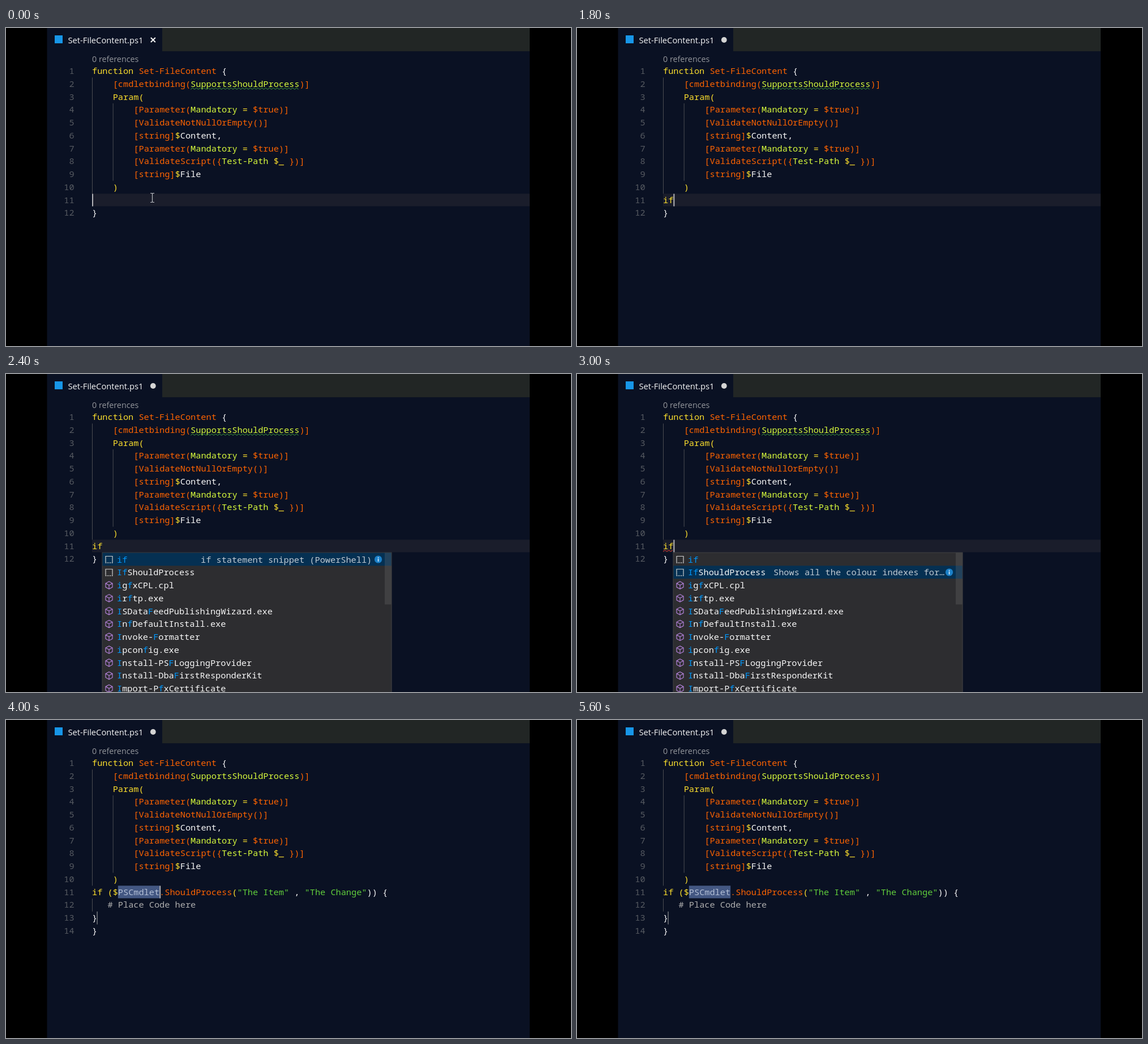
These frames come from a looping animation (998 px wide and 561 px high, 5.8 s). An HTML page:

```html
<!DOCTYPE html>
<html lang="en">
<head>
<meta charset="utf-8">
<title>Editor snippet</title>
<style>
html, body { margin: 0; width: 100%; height: 100%; overflow: hidden; background: #000; }
svg { display: block; width: 998px; height: 561px; }
text { white-space: pre; font: 500 15.28px "Noto Sans Mono", monospace; font-variant-ligatures: none; }
.ui { font-family: "Open Sans", sans-serif; font-weight: 400; }
.w { fill: #f8f8f8; }
.y { fill: #fbde2d; }
.o { fill: #ff6400; }
.l { fill: #d8fa3c; }
.g { fill: #61ce3c; }
.c { fill: #aeaeae; }
.s { fill: #b3bfd6; }
.n { fill: #565a61; font-weight: 400; }
.b { fill: #0097fb; }
.d { fill: #c2cad2; font-weight: 400; }
</style>
</head>
<body>
<svg id="stage" viewBox="0 0 998 561"></svg>
<script>
const NS = "http://www.w3.org/2000/svg";
const CH = 9.168, ROW = 22.77, LEFT = 152;
const LOOP = 5800;
const stage = document.getElementById("stage");

function add(parent, tag, attrs, content) {
  const el = document.createElementNS(NS, tag);
  for (const k in attrs) el.setAttribute(k, attrs[k]);
  if (content !== undefined) el.textContent = content;
  parent.appendChild(el);
  return el;
}
const group = (parent = stage) => add(parent, "g", {});
const rect = (p, x, y, width, height, fill) => add(p, "rect", { x, y, width, height, fill });
const path = (p, d, stroke, width = 1) =>
  add(p, "path", { d, stroke, "stroke-width": width, fill: "none" });
const baseline = line => 81 + (line - 1) * ROW;
const lineTop = line => 64.6 + (line - 1) * ROW;
const show = (el, on) => el.setAttribute("visibility", on ? "inherit" : "hidden");

// Alternating class and text: "y", "if", "w", " {"
function runs(p, x, y, parts) {
  const t = add(p, "text", { x, y });
  for (let i = 0; i < parts.length; i += 2)
    add(t, "tspan", { class: parts[i] }, parts[i + 1]);
  return t;
}
const code = (p, line, col, ...parts) => runs(p, LEFT + col * CH, baseline(line), parts);

function number(p, line) {
  add(p, "text", { x: 120.7, y: baseline(line), class: "n", "text-anchor": "end" }, line);
}
function guide(p, col, from, to) {
  const top = lineTop(from);
  rect(p, LEFT + col * CH, top, 1, lineTop(to + 1) - top, "#4a4d52");
}
function squiggle(p, line, col, count, color) {
  const y = baseline(line) + 3.2, x0 = LEFT + col * CH, x1 = x0 + count * CH;
  let d = `M${x0} ${y + 1.3}`;
  for (let x = x0 + 3.4, up = true; x <= x1 + 1; x += 3.4, up = !up)
    d += `L${x} ${y + (up ? -1.3 : 1.3)}`;
  return path(p, d, color, 1);
}
const bar = (p, line, col) =>
  rect(p, LEFT + col * CH, lineTop(line) + .2, 2, ROW - .7, "#b4b4b8");

// Window
rect(stage, 0, 0, 998, 561, "#000");
rect(stage, 72.5, 0, 852.5, 561, "#0a1123");
rect(stage, 276, 0, 649, 41, "#222625");
rect(stage, 86, 13, 14, 14, "#1796e8");
add(stage, "text", { x: 109.5, y: 27, class: "ui w", style: "font-size:14.74px" }, "Set-FileContent.ps1");
add(stage, "text", { x: 152, y: 60, class: "ui", fill: "#94979c", style: "font-size:14.3px" }, "0 references");
const cross = path(stage, "M255.8 17L263.8 25M263.8 17L255.8 25", "#f0f0f0", 2);
const dot = add(stage, "circle", { cx: 259.8, cy: 21, r: 4.9, fill: "#d4d4d4" });

// Code that stays
const rowMark = rect(stage, LEFT, lineTop(11), 925 - LEFT, ROW - .6, "#1a1d2b");
guide(stage, 0, 2, 10);
guide(stage, 4, 4, 9);
for (let i = 1; i <= 12; i++) number(stage, i);
const mandatory = ["o", "[Parameter(", "l", "Mandatory", "y", " = ", "o", "$true)]"];
code(stage, 1, 0, "y", "function", "o", " Set-FileContent", "w", " {");
code(stage, 2, 4, "o", "[cmdletbinding(", "l", "SupportsShouldProcess", "o", ")]");
code(stage, 3, 4, "y", "Param(");
code(stage, 4, 8, ...mandatory);
code(stage, 5, 8, "o", "[ValidateNotNullOrEmpty()]");
code(stage, 6, 8, "o", "[string]", "y", "$", "w", "Content,");
code(stage, 7, 8, ...mandatory);
code(stage, 8, 8, "o", "[ValidateScript({", "l", "Test-Path ", "y", "$_", "o", " })]");
code(stage, 9, 8, "o", "[string]", "y", "$", "w", "File");
code(stage, 10, 4, "y", ")");
const warning = squiggle(stage, 2, 19, 21, "#3f9f3f");

// Typing
const typing = group();
const typed = code(typing, 11, 0, "y", "").firstChild;
code(typing, 12, 0, "w", "}");

// Inserted snippet
const snippet = group();
number(snippet, 13);
number(snippet, 14);
rect(snippet, LEFT + 5 * CH, lineTop(11), 8 * CH, ROW - .6, "#435782");
guide(snippet, 0, 12, 12);
code(snippet, 11, 0, "y", "if ($", "s", "PSCmdlet", "o", ".ShouldProcess", "y", "(",
  "g", "\"The Item\"", "w", " , ", "g", "\"The Change\"", "w", ")) {");
code(snippet, 12, 3, "c", "# Place Code here");
code(snippet, 13, 0, "w", "}");
code(snippet, 14, 0, "w", "}");
rect(snippet, 160.3, lineTop(13), 1.6, ROW, "#6b6f76");

const error = squiggle(stage, 11, 0, 2, "#f03a2a");
const caret = bar(stage, 11, 0);
const pointer = path(stage,
  "M255 291.5H257.5L258.5 292.5L259.5 291.5H262M258.5 292V307M255 307.5H257.5L258.5 306.5L259.5 307.5H262",
  "#b9bcc2", 1.2);

// Suggestion list; * surrounds matched letters
const popup = group();
const items = ["*if*", "*If*ShouldProcess", "*i*g*f*xCPL.cpl", "*i*r*f*tp.exe",
  "*I*SData*F*eedPublishingWizard.exe", "*I*n*f*DefaultInstall.exe", "*I*nvoke-*F*ormatter",
  "*i*pcon*f*ig.exe", "*I*nstall-PS*F*LoggingProvider", "*I*nstall-Dba*F*irstResponderKit",
  "*I*mport-P*f*xCertificate"];
rect(popup, 169.5, 314.5, 512, 260, "#454545");
rect(popup, 170.5, 315.5, 510, 260, "#2d2d30");
const chosen = rect(popup, 170.5, 0, 510, ROW, "#053052");
rect(popup, 669, 315.5, 11.5, 91, "#797979").setAttribute("opacity", .25);

items.forEach((item, i) => {
  const mid = 327 + i * ROW;
  const parts = item.split("*").flatMap((s, j) => [j % 2 ? "b" : "w", s]);
  runs(popup, 196, mid + 5.5, parts);
  if (i < 2) {
    path(popup, `M176 ${mid + 5}V${mid - 5.5}H188V${mid + 5}`, "#d0d0d0", 1.2);
    path(popup, `M175.5 ${mid + 6}H189`, "#d0d0d0", 1.5).setAttribute("stroke-dasharray", "2 1.7");
  } else {
    path(popup, `M182 ${mid - 6.5}L188 ${mid - 3.3}V${mid + 3.5}L182 ${mid + 6.8}L176 ${mid + 3.5}V${mid - 3.3}Z` +
      `M176 ${mid - 3.3}L182 ${mid}L188 ${mid - 3.3}M182 ${mid}V${mid + 6.8}`, "#b180d7", 1.2);
  }
});

const details = [[344, "if statement snippet (PowerShell)"],
  [347, "Shows all the colour indexes for\u2026"]].map(([x, label], i) => {
  const g = group(popup), mid = 327 + i * ROW;
  runs(g, x, mid + 5.5, ["d", label]);
  add(g, "circle", { cx: 657.5, cy: mid, r: 6.6, fill: "#1b80c8" });
  rect(g, 656.7, mid - 1.2, 1.7, 5, "#dbe9f4");
  rect(g, 656.7, mid - 3.9, 1.7, 1.7, "#dbe9f4");
  return g;
});

const hiddenCaret = [[400, 1000], [2400, 2800], [3600, 4000], [4600, 5200], [5600, 5800]];
const within = (t, a, b) => t >= a && t < b;

function draw(t) {
  const inserted = t >= 3200, dirty = t >= 1400;
  const word = t < 1400 ? "" : t < 1800 ? "i" : "if";
  const pick = t < 2800 ? 0 : 1;
  typed.textContent = word;
  show(typing, !inserted);
  show(snippet, inserted);
  show(rowMark, !inserted);
  show(cross, !dirty);
  show(dot, dirty);
  show(pointer, t < 200);
  show(popup, within(t, 2000, 3200));
  show(warning, t < 4000);
  show(error, within(t, 2600, 4000));
  chosen.setAttribute("y", 315.5 + pick * ROW);
  details.forEach((g, i) => show(g, i === pick));
  caret.setAttribute("x", LEFT + (inserted ? 13 : word.length) * CH);
  show(caret, !hiddenCaret.some(([a, b]) => within(t, a, b)));
}

function tick() {
  draw(performance.now() % LOOP);
  requestAnimationFrame(tick);
}
tick();
</script>
</body>
</html>
```
